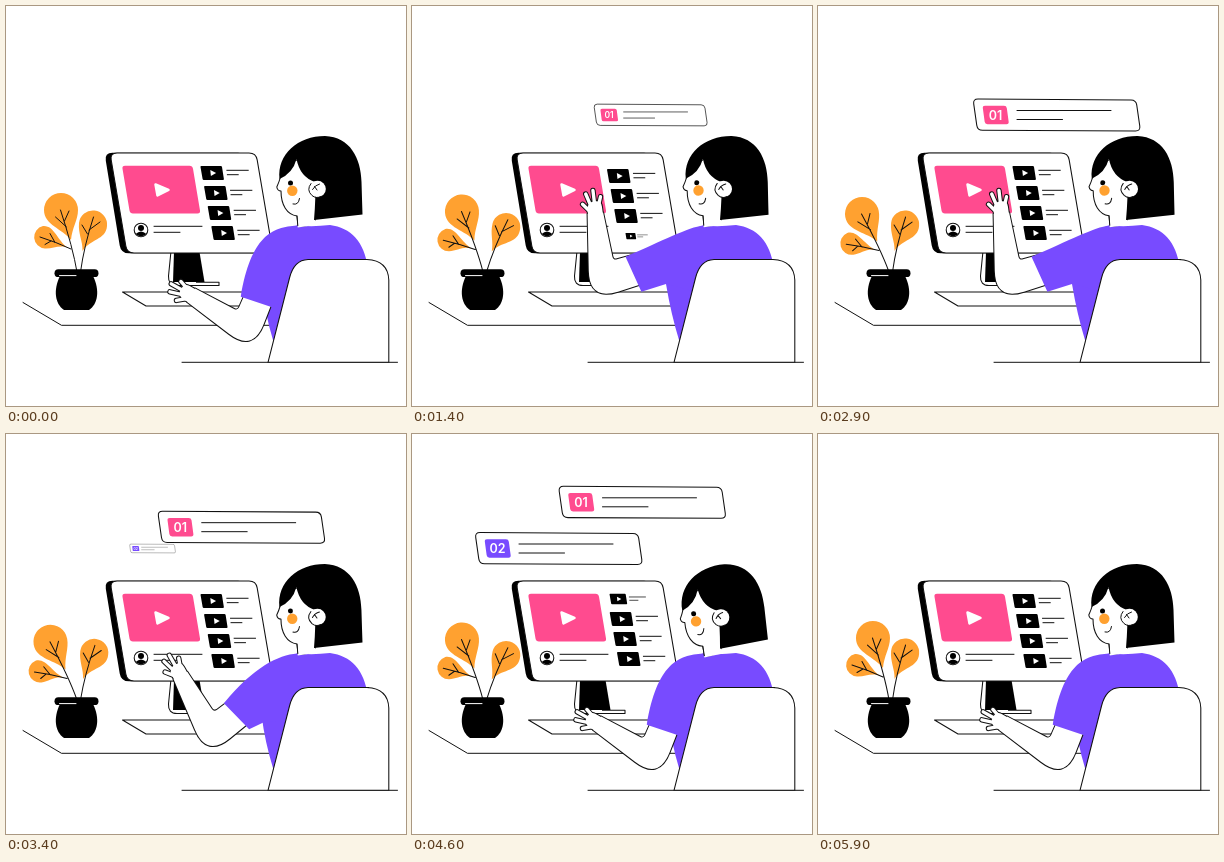
Recreate the animation shown at these times as an HTML page. Size 400 by 400 pixels, loop 6000 ms.

```html
<!DOCTYPE html>
<html lang="en">
<head>
<meta charset="utf-8">
<title>Video lessons</title>
<style>
  html, body { margin: 0; width: 100%; height: 100%; overflow: hidden; background: #fff; }
  svg { display: block; width: 100%; height: 100%; }
  .line { fill: none; stroke: #111; stroke-width: 1; stroke-linecap: round; stroke-linejoin: round; }
  .paper { fill: #fff; stroke: #111; stroke-width: 1.05; stroke-linejoin: round; }
  .ink { fill: #000; }
  .leaf { fill: #ffa130; }
  .pink { fill: #ff4b8f; }
  .violet { fill: #784bff; }
  .num { font: 600 12.5px Inter, Roboto, sans-serif; fill: #fff; text-anchor: middle; }
</style>
</head>
<body>
<svg viewBox="0 0 400 400">
  <defs>
    <g id="thumb">
      <path class="ink" d="M-11 -7H8.500Q9.500 -7 9.700 -6L11.600 6Q11.700 7 10.700 7H-8.500Q-9.500 7 -9.700 6L-11.800 -6Q-12 -7 -11 -7Z"/>
      <path fill="#fff" d="M-2 -3L3.800 0L-1.400 3Z"/>
      <path class="line" d="M14.500 -2.700H36M15 1.700H26"/>
    </g>
  </defs>

  <path class="line" d="M17 296.500L55.500 319.300H300M176 356.300H391.500"/>
  <path class="paper" d="M116.500 286H257L268 300H140Z"/>

  <g id="monitor">
    <path class="paper" d="M165 245L162.500 270Q162 279.500 171 279.500H213V276.300H190"/>
    <path class="ink" d="M168 246H193.500L198.500 276H167Z"/>
    <path class="ink" id="side"/>
    <path class="paper" id="front"/>
    <path class="pink" id="video"/>
    <path d="M149.500 178.500L162.500 184L151.500 189.500Z" fill="#fff" stroke="#fff" stroke-width="2.500" stroke-linejoin="round"/>
    <circle class="paper" cx="135" cy="224" r="6.800"/>
    <circle class="ink" cx="135" cy="222" r="3"/>
    <path class="ink" d="M129.600 228Q135 223 140.400 228Q135 232.500 129.600 228Z"/>
    <path class="line" d="M148 220.300H196M148 226.300H174"/>
    <g id="list"></g>
  </g>

  <g id="cards"></g>

  <g id="bigStem">
    <path class="leaf" d="M65 234C57 223 38 219 38 204A17 17 0 0 1 72 204C72 214 66 222 65 234Z"/>
    <path class="leaf" d="M62 242C54 238 47 243 39 242.500A11.400 11.400 0 0 1 37 220C48 219 51 234 62 242Z"/>
    <path class="line" d="M71 266Q67 242 54.500 204M60.500 221L49.500 211M58.500 215L63 205M65 243Q50 236 34 231M45 235L39 238.500M49 236.500L44 227.500"/>
  </g>
  <g id="smallStem">
    <path class="leaf" d="M76.500 245C77 235 72 228 73 217A14 14 0 0 1 101 220C100 234 84 233 76.500 245Z"/>
    <path class="line" d="M74.500 266Q78 240 87.500 211M81.500 228L76 219M83 224L94 216"/>
  </g>
  <rect class="ink" x="48.500" y="263.300" width="44" height="7.800" rx="3.900"/>
  <path class="ink" d="M54 270C47 284 49 298 58 304H83C92 298 94 284 87 270Z"/>
  <path d="M53.500 269.600H70" stroke="#fff" stroke-width="1" stroke-linecap="round"/>

  <path fill="#fff" d="M290 204L291.500 222H326V200Z"/>
  <path class="violet" id="torso"/>
  <g id="arm"></g>
  <path class="violet" id="sleeve"/>

  <g id="head">
    <path class="paper" d="M277 160Q275 172 270.800 181Q271.500 185 275 185C275 199 281 208.500 291 210L292 219.500Q300 222 309 214L318 180L300 150Z"/>
    <path fill="#fff" d="M291.700 207V221.500L309 219V206Z"/>
    <path class="line" d="M291 210L291.800 219.500"/>
    <path class="ink" d="M273.500 173C271 148 292 130 319 130C344 131 355 152 355.500 176Q356 193 356.500 208.500L308 214Q310 190 309 176Q294 171 290.500 153Q287 167 273.500 173Z"/>
    <circle fill="#fff" cx="311.500" cy="183" r="8.300"/>
    <path class="line" d="M305 177.500Q300 184 306 189.500Q310 193 315 190.500M306.500 183.500Q309 179 313.500 178M308.500 180.500L311 184"/>
    <circle class="ink" cx="284.500" cy="177" r="2.500"/>
    <circle class="leaf" cx="286.300" cy="184.700" r="5.200"/>
    <path class="line" d="M287 198Q292.500 199.500 293.500 192.500"/>
  </g>

  <path class="paper" d="M262 356.300L283.500 272Q288 254 302 253.500H361Q382 254.500 382.800 274V356.300Z"/>
</svg>

<script>
const LOOP = 6000, STEP = 100;
const $ = id => document.getElementById(id);
const mix = (a, b, k) => a + (b - a) * k;
const ease = k => (1 - Math.cos(Math.PI * k)) / 2;
const polar = (o, deg, r) => {
  const a = deg * Math.PI / 180;
  return [o[0] + Math.cos(a) * r, o[1] + Math.sin(a) * r];
};

// Eased value from a table of [time, value] steps.
function track(steps, t) {
  let prev = steps[0];
  for (const s of steps) {
    if (t < s[0]) {
      const k = (t - prev[0]) / (s[0] - prev[0]);
      return k < 0 ? s[1] : mix(prev[1], s[1], ease(k));
    }
    prev = s;
  }
  return prev[1];
}

// Closed polygon with rounded corners; a point may carry its own radius.
function rounded(pts, radius) {
  const toward = (a, b, r) => {
    const d = Math.hypot(b[0] - a[0], b[1] - a[1]);
    const k = Math.min(r, d / 2) / d;
    return [mix(a[0], b[0], k), mix(a[1], b[1], k)];
  };
  return pts.map((p, i) => {
    const r = p[2] ?? radius, n = pts.length;
    const a = toward(p, pts[(i + n - 1) % n], r);
    const b = toward(p, pts[(i + 1) % n], r);
    return `${i ? 'L' : 'M'}${a}Q${p[0]} ${p[1]} ${b}`;
  }).join('') + 'Z';
}

const slab = (x1, x2, y1, y2, slant, r) =>
  rounded([[x1, y1], [x2, y1], [x2 + slant, y2], [x1 + slant, y2]], r);

$('side').setAttribute('d', slab(98.5, 240, 146.8, 247.3, 16.5, 8));
$('front').setAttribute('d', slab(104, 250, 147, 247, 17, 7));
$('video').setAttribute('d', slab(116, 186.5, 159.8, 207.5, 8, 3));

// Video list
const ROW = 20;
const scrolls = [880, 2170, 3380, 4457], SCROLL_MS = 700;
$('list').innerHTML = '<use href="#thumb"/>'.repeat(5);
const rows = [...$('list').children];

function drawList(t) {
  const start = scrolls.find(s => t >= s && t < s + SCROLL_MS);
  const p = start === undefined ? 0 : ease((t - start) / SCROLL_MS);
  rows.forEach((row, i) => {
    const dy = (i - p) * ROW;
    let s = 1;
    if (i === 0) s = Math.max(0, 1 - p * 2.5);
    if (i === 4) s = Math.max(0, (p - 0.62) / 0.38) ** 1.5;
    row.setAttribute('transform',
      `translate(${208.3 + dy * 0.182} ${167 + dy}) scale(${s}) translate(-2 0)`);
  });
}

// Lesson cards
const cards = [
  { num: '01', tone: 'pink', from: [238.5, 109], to: [230, 68.3],
    size: [[1080, 0], [1650, 1.14], [2000, 1], [5450, 1], [5850, 0]],
    move: [[2950, 0], [4000, 1], [4600, 1], [5200, 0]] },
  { num: '02', tone: 'violet', from: [146.5, 114.5], to: [146.5, 114.5],
    size: [[3250, 0], [3700, 1.1], [3950, 1], [4600, 1], [4900, 0]],
    move: [[0, 0]] }
];
$('cards').innerHTML = cards.map(c => `<g>
  <path class="paper" d="${rounded([[-83.5, -16], [79.5, -15], [84, 16], [-79, 15.3]], 5)}"/>
  <path class="${c.tone}" d="${slab(-74, -50, -9.3, 9.3, 2.5, 2.5)}"/>
  <text class="num" x="-61" y="4.6">${c.num}</text>
  <path class="line" d="M-39.500 -4.500H54.500M-39.500 4.500H6"/></g>`).join('');
cards.forEach((c, i) => c.node = $('cards').children[i]);

function drawCard(c, t) {
  const k = track(c.move, t);
  const x = mix(c.from[0], c.to[0], k), y = mix(c.from[1], c.to[1], k);
  c.node.setAttribute('transform', `translate(${x} ${y}) scale(${track(c.size, t)})`);
}

// Arm, hand and sleeve
const SHOULDER = [264, 241];
const lift = [[250, 0], [1250, 1], [1600, 1], [2150, 0.92], [2300, 0.92],
              [2800, 1], [2950, 1], [3950, 0]];
const fingers = [[2, -5, 10, -12], [8, -4, 20, -8], [9, 0, 23, -0.5], [8, 4, 16, 6.5]];
const handPath = fingers.map(f => `M${f[0]} ${f[1]}L${f[2]} ${f[3]}`).join('');
const palm = rounded([[-3, -7.5], [8, -7.5], [12, -3], [12, 4], [9, 7], [-3, 7.5]], 3);
const limb = '<path class="bone"/><g class="hand">' +
  `<path d="${palm}"/><path d="${handPath}" class="fingers"/></g>`;
$('arm').innerHTML =
  `<g fill="#111" stroke="#111" stroke-width="2" stroke-linejoin="round">${limb}</g>` +
  `<g fill="#fff" stroke="none">${limb}</g>`;
const bones = document.querySelectorAll('.bone');
const hands = document.querySelectorAll('.hand');
document.querySelectorAll('.fingers').forEach((f, i) => {
  f.setAttribute('style', `fill:none;stroke:${i ? '#fff' : '#111'};` +
    `stroke-width:${i ? 3.4 : 5.4};stroke-linecap:round`);
});

function drawArm(t) {
  const k = track(lift, t);
  const a1 = mix(108.4, 155.6, k), a2 = mix(211, 265.2, k);
  const elbow = polar(SHOULDER, a1, mix(84, 82.3, k));
  const wrist = polar(elbow, a2, mix(61, 68, k));
  const out = (a1 + a2) / 2 - 90;
  const path = rounded([
    [...polar(SHOULDER, a1 - 90, mix(22, 25, k)), 0],
    [...polar(elbow, out, mix(27, 23, k)), 30],
    [...polar(wrist, a2 - 90, 7.8), 0],
    [...polar(wrist, a2 + 90, 7.8), 0],
    [...polar(elbow, out + 180, mix(17, 24, k)), 4],
    [...polar(SHOULDER, a1 + 90, 4), 0]
  ], 0);
  bones.forEach(b => b.setAttribute('d', path));
  hands.forEach(h => h.setAttribute('transform', `translate(${wrist}) rotate(${a2})`));

  const cuff = polar(SHOULDER, a1, mix(56.5, 50, k));
  const top = polar(cuff, a1 + 90, 12), low = polar(cuff, a1 - 90, mix(21, 26.5, k));
  const pit = [mix(258, 254, k), mix(288, 278, k)];
  $('torso').setAttribute('d',
    `M291 219.500Q264 226 ${pit}Q259 308 267 334` +
    'H330L362 300V262C358 235 345 222 324 219Q308 221 291 219.500Z');
  $('sleeve').setAttribute('d',
    `M291 219.500C${mix(266, 277, k)} 221 ${mix(245, 250, k)} ${mix(230, 235, k)} ${top}` +
    `L${low}L${mix(268, 254, k)} ${mix(300, 278, k)}L300 290V221Z`);
}

const nod = [[0, 0], [700, 0.4], [3000, 0.4], [3800, -0.6], [4600, -4.6], [4900, -4.6], [5700, 0]];

function draw(t) {
  const sway = ease(t / 3000), flick = ease(t / 1500);
  $('bigStem').setAttribute('transform', `rotate(${-10.5 * sway} 71 266)`);
  $('smallStem').setAttribute('transform', `rotate(${9 * flick} 74.5 266)`);
  $('head').setAttribute('transform', `rotate(${track(nod, t)} 318 214)`);
  drawList(t);
  cards.forEach(c => drawCard(c, t));
  drawArm(t);
}

const begin = performance.now();
function tick() {
  const t = (performance.now() - begin) % LOOP;
  draw(Math.floor(t / STEP) * STEP);
  requestAnimationFrame(tick);
}
tick();
</script>
</body>
</html>
```
